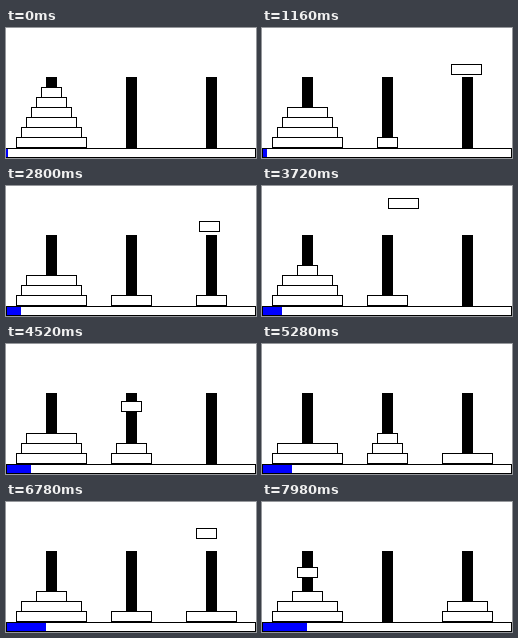
Recreate the animation shown at these times as an HTML page with a canvas. Size 250 by 130 pixels, loop 8000 ms.

```html
<!DOCTYPE html>
<html lang="en">
<head>
<meta charset="utf-8">
<title>Tower of Hanoi</title>
<style>
html, body { margin: 0; width: 100%; height: 100%; overflow: hidden; background: #fff; }
canvas { display: block; width: 250px; height: 130px; image-rendering: pixelated; }
</style>
</head>
<body>
<canvas width="250" height="130"></canvas>
<script>
const ctx = document.querySelector('canvas').getContext('2d');
const LOOP = 8000, TICK = 20, STEPS = 32;
const DISCS = 6, FLOOR = 109, LANE = 44, RADIUS = 40;
const pegX = peg => 45 + 80 * peg;
const levelY = level => FLOOR - 10 * level;

function solve(disc, from, to, via) {
  if (!disc) return [];
  return [...solve(disc - 1, from, via, to), { from, to }, ...solve(disc - 1, via, to, from)];
}
const moves = solve(DISCS, 0, 2, 1);

// Stacks before each move, largest disc first.
const states = [[[6, 5, 4, 3, 2, 1], [], []]];
for (const { from, to } of moves) {
  const next = states[states.length - 1].map(stack => [...stack]);
  next[to].push(next[from].pop());
  states.push(next);
}

// Up, around a corner, across, around a corner, down: all at constant speed.
function pathPoint(x0, y0, x1, y1, part) {
  const dir = Math.sign(x1 - x0);
  const rise = y0 - LANE, fall = y1 - LANE;
  const corner = RADIUS * Math.PI / 2;
  const across = Math.abs(x1 - x0) - 2 * RADIUS;
  const total = rise + corner + across + corner + fall;
  const turn = (x, sign, length) => {
    const a = length / RADIUS;
    return [x + sign * RADIUS * (1 - Math.cos(a)), LANE - RADIUS * Math.sin(a)];
  };
  let d = part * total;
  if (d <= rise) return [x0, y0 - d];
  d -= rise;
  if (d <= corner) return turn(x0, dir, d);
  d -= corner;
  if (d <= across) return [x0 + dir * (RADIUS + d), LANE - RADIUS];
  d -= across;
  if (d <= corner) return turn(x1, -dir, corner - d);
  return [x1, LANE + d - corner];
}

function fill(color, x, y, w, h) {
  ctx.fillStyle = color;
  ctx.fillRect(x, y, w, h);
}

function box(x, y, w, h) {
  fill('#000', x, y, w, h);
  fill('#fff', x + 1, y + 1, w - 2, h - 2);
}

function drawDisc(disc, x, y) {
  const half = 5 + 5 * disc;
  box(Math.floor(x + 1e-6) - half, Math.ceil(y - 1e-6), 2 * half + 1, 11);
}

function drawProgress(tick) {
  const width = 5 * Math.floor((tick + 7.25) / 41.25);
  if (width) fill('#00f', 1, 121, width - 1, 8);
  else fill('#00f', 0, 121, 2, 8);
}

function draw(time) {
  const tick = Math.floor((time % LOOP) / TICK + 1e-6);
  const step = Math.max(0, tick - 1);
  const index = Math.floor(step / (STEPS + 1));
  const part = (step % (STEPS + 1)) / STEPS;
  const { from, to } = moves[index];
  const stacks = states[index];

  fill('#fff', 0, 0, 250, 130);
  box(0, 120, 250, 10);
  drawProgress(tick);
  for (let peg = 0; peg < 3; peg++) fill('#000', pegX(peg) - 5, 49, 11, 71);

  const top = stacks[from].length - 1;
  stacks.forEach((stack, peg) => stack.forEach((disc, level) => {
    if (peg !== from || level !== top) drawDisc(disc, pegX(peg), levelY(level));
  }));
  const [x, y] = pathPoint(pegX(from), levelY(top), pegX(to), levelY(stacks[to].length), part);
  drawDisc(stacks[from][top], x, y);
}

const start = performance.now();
function play() {
  draw(performance.now() - start);
  requestAnimationFrame(play);
}
play();
</script>
</body>
</html>
```
